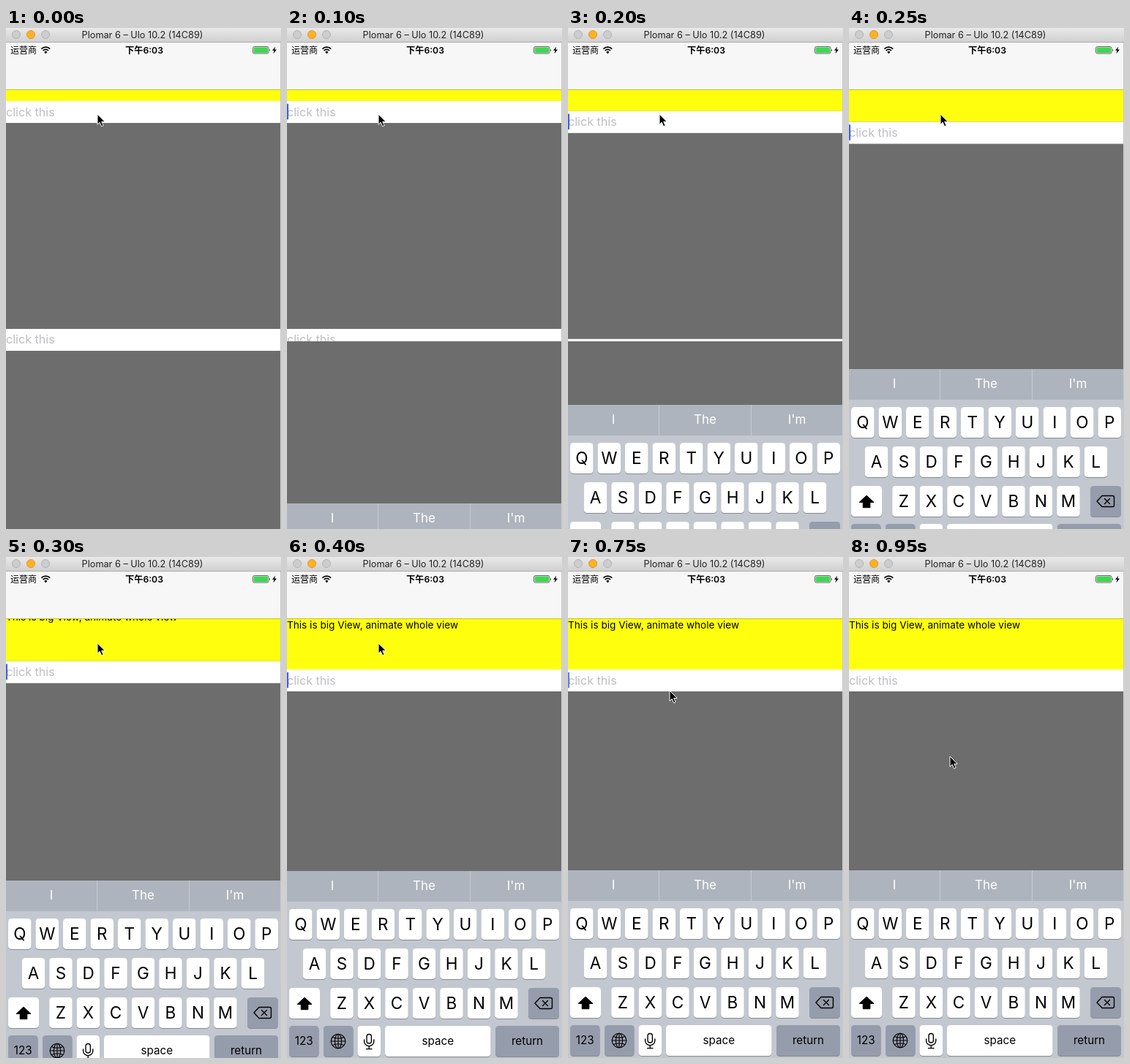
Animation, 376 px wide and 686 px high, one loop 1000 ms. Source, as an HTML page:

```html
<!DOCTYPE html>
<html lang="en">
<head>
<meta charset="utf-8">
<title>Keyboard avoidance</title>
<style>
  html, body { margin: 0; width: 100%; height: 100%; overflow: hidden; background: #6d6d6d; }
  svg { display: block; font-family: Inter, Roboto, sans-serif; }
  .cjk { font-family: Inter, "Noto Sans CJK SC", "Noto Sans CJK", sans-serif; }
  .hint { font-size: 16.1px; fill: #bfbfc3; }
  .mid { text-anchor: middle; }
  .letter { font-size: 22.5px; }
  .word { font-size: 15.2px; }
  .line { fill: none; stroke: #000; stroke-width: 1.4; stroke-linejoin: round; stroke-linecap: round; }
</style>
</head>
<body>
<svg width="376" height="686" viewBox="0 0 376 686">
  <defs>
    <linearGradient id="bar" x2="0" y2="1">
      <stop stop-color="#e9e9e9"/><stop offset="1" stop-color="#cfcfcf"/>
    </linearGradient>
    <clipPath id="clip"><rect id="clipBox" width="376" height="686"/></clipPath>
  </defs>
  <rect width="376" height="686" fill="#6d6d6d"/>

  <g clip-path="url(#clip)">
    <g id="view">
      <rect y="30" width="375" height="70" fill="#ffff0d"/>
      <text x="0" y="44" font-size="13.6">This is big View, animate whole view</text>
      <rect y="100" width="375" height="30" fill="#fff"/>
      <text class="hint" x="0" y="120.5">click this</text>
      <rect id="caret" y="103.5" width="2" height="22" rx="1" fill="#405fe8"/>
      <rect y="412" width="375" height="30" fill="#fff"/>
      <text class="hint" x="0" y="432">click this</text>
    </g>
  </g>

  <rect y="20" width="376" height="64" fill="#f7f7f7"/>
  <rect y="84" width="375" height="1" fill="#c0c03c"/>
  <g class="cjk" font-size="12">
    <text x="6" y="34.5">运营商</text>
    <text class="mid" x="189" y="34.5" font-weight="600" font-size="12.2">下午6:03</text>
  </g>
  <g fill="none" stroke="#000" stroke-width="1.7">
    <path d="M48.4 28.6a8.2 8.2 0 0 1 11.8 0M50.6 31a5.2 5.2 0 0 1 7.4 0"/>
    <path d="M54.3 35.2l-2.1-2.3a3 3 0 0 1 4.2 0z" fill="#000" stroke="none"/>
  </g>
  <rect x="337.5" y="25.5" width="21.5" height="9.5" rx="2" fill="none" stroke="#555" stroke-width=".9"/>
  <rect x="338.6" y="26.6" width="19.3" height="7.3" rx="1" fill="#3fd653"/>
  <path d="M360 28.5q1.8 1.7 0 3.5z" fill="#333"/>
  <path d="M368.4 25.5l-4.4 5.3h2.6l-1.2 4.4 4.6-5.6h-2.8z"/>

  <g id="keyboard">
    <rect width="375" height="257" fill="#c3c7d0"/>
    <rect width="375" height="42" fill="#aeb4bd"/>
    <path d="M124.5 0v42M250.5 0v42" stroke="#c6cad1"/>
    <g class="mid" fill="#fff" font-size="17">
      <text x="62" y="25.5">I</text><text x="187.5" y="25.5">The</text><text x="313" y="25.5">I'm</text>
    </g>
    <g id="keys"></g>
    <path d="M24 173l10 9.5h-5.2v7.2h-9.6v-7.2H14z" stroke="#000" stroke-linejoin="round"/>
    <path class="line" d="M346 173.5h14.5q2 0 2 2v11q0 2-2 2H346l-7-7.5zM349.5 177.5l7 7m0-7l-7 7"/>
    <g class="line" style="stroke-width:1.1">
      <circle cx="70" cy="233" r="9.8"/>
      <ellipse cx="70" cy="233" rx="4.6" ry="9.8"/>
      <path d="M70 223.2v19.6M60.2 233h19.6M62.2 227.4q7.8 3.6 15.6 0M62.2 238.6q7.8-3.6 15.6 0"/>
    </g>
    <rect class="line" x="109" y="223.5" width="6.4" height="12.5" rx="3.2"/>
    <path class="line" d="M105.6 231v2.2a6.6 6.6 0 0 0 13.2 0V231M112.2 239.8v3.6M108.4 243.6h7.6"/>
  </g>

  <rect x="375" y="20" width="1" height="666" fill="#c9c9c9"/>
  <rect width="376" height="20" fill="url(#bar)"/>
  <rect y="19" width="376" height="1" fill="#aeaeae"/>
  <g fill="#cdcdcd" stroke="#b2b2b2">
    <circle cx="14" cy="9" r="5.5"/>
    <circle cx="34" cy="9" r="5.5" fill="#fdb124" stroke="#dd982a"/>
    <circle cx="54" cy="9" r="5.5"/>
  </g>
  <text class="mid" x="186.5" y="14" font-size="12.7" fill="#222">Plomar 6 – Ulo 10.2 (14C89)</text>

  <path id="pointer" d="M0 0v14.2l3.2-3 2.4 5.5 2.5-1.1-2.4-5.3h4.5z" stroke="#fff" stroke-width="1"/>
</svg>
<script>
const $ = id => document.getElementById(id);
const LOOP = 1000, STEP = 50;

function key(x, y, w, label, { dark = false, cls = 'letter', drop = 29 } = {}) {
  const box = (dy, fill) =>
    `<rect x="${x}" y="${y + dy}" width="${w}" height="42" rx="4.5" fill="${fill}"/>`;
  return box(1, '#878b93') + box(0, dark ? '#959cab' : '#fff') +
    `<text class="mid ${cls}" x="${x + w / 2}" y="${y + drop}">${label}</text>`;
}

const row = (letters, x, y) =>
  [...letters].map((c, i) => key(x + i * 37.5, y, 31.5, c)).join('');

const word = { cls: 'word', drop: 26 };
const darkWord = { ...word, dark: true };
$('keys').innerHTML =
  row('QWERTYUIOP', 3, 52) + row('ASDFGHJKL', 21.75, 106) + row('ZXCVBNM', 59.2, 160) +
  key(3, 160, 42, '') + key(330, 160, 42, '', darkWord) +
  key(3, 212, 40.5, '123', darkWord) + key(50, 212, 40.5, '', darkWord) +
  key(96.5, 212, 31.5, '') + key(134, 212, 144.5, 'space', word) +
  key(285, 212, 87, 'return', darkWord);

// Rows of [time, value, ...], read with linear interpolation
const keyboardY = [[50, 686], [100, 651], [150, 577], [200, 516], [250, 467],
  [300, 443], [350, 433.5], [400, 430], [450, 429]];
const pointerAt = [[550, 125, 118], [600, 127, 125], [650, 130, 140], [700, 135, 161],
  [750, 139, 183], [900, 138, 256], [950, 138, 273]];
const caretAlpha = [[700, 1], [750, .8], [800, .45], [850, .15], [900, 0]];

function at(table, t, col = 1) {
  const i = table.findIndex(r => r[0] >= t);
  if (i < 0) return table[table.length - 1][col];
  if (i === 0) return table[0][col];
  const a = table[i - 1], b = table[i];
  return a[col] + (b[col] - a[col]) * (t - a[0]) / (b[0] - a[0]);
}

// cubic-bezier(.42, 0, .58, 1)
function easeInOut(x) {
  if (x <= 0) return 0;
  if (x >= 1) return 1;
  let lo = 0, hi = 1;
  for (let i = 0; i < 24; i++) {
    const s = (lo + hi) / 2, q = 1 - s;
    if (3 * q * q * s * .42 + 3 * q * s * s * .58 + s * s * s < x) lo = s;
    else hi = s;
  }
  return lo * lo * (3 - 2 * lo);
}

const move = (id, x, y) => $(id).setAttribute('transform', `translate(${x} ${y})`);

function draw(t) {
  const focused = t >= 100;
  move('view', 0, 54 * easeInOut((t - 95) / 300));
  move('keyboard', 0, at(keyboardY, t));
  move('pointer', at(pointerAt, t), at(pointerAt, t, 2));
  $('clipBox').setAttribute('height', focused ? 429 : 686);
  $('caret').setAttribute('opacity', focused ? at(caretAlpha, t) : 0);
}

const start = performance.now();
function tick() {
  const t = (performance.now() - start) % LOOP;
  draw(Math.floor(t / STEP) * STEP);
  requestAnimationFrame(tick);
}
tick();
</script>
</body>
</html>
```
